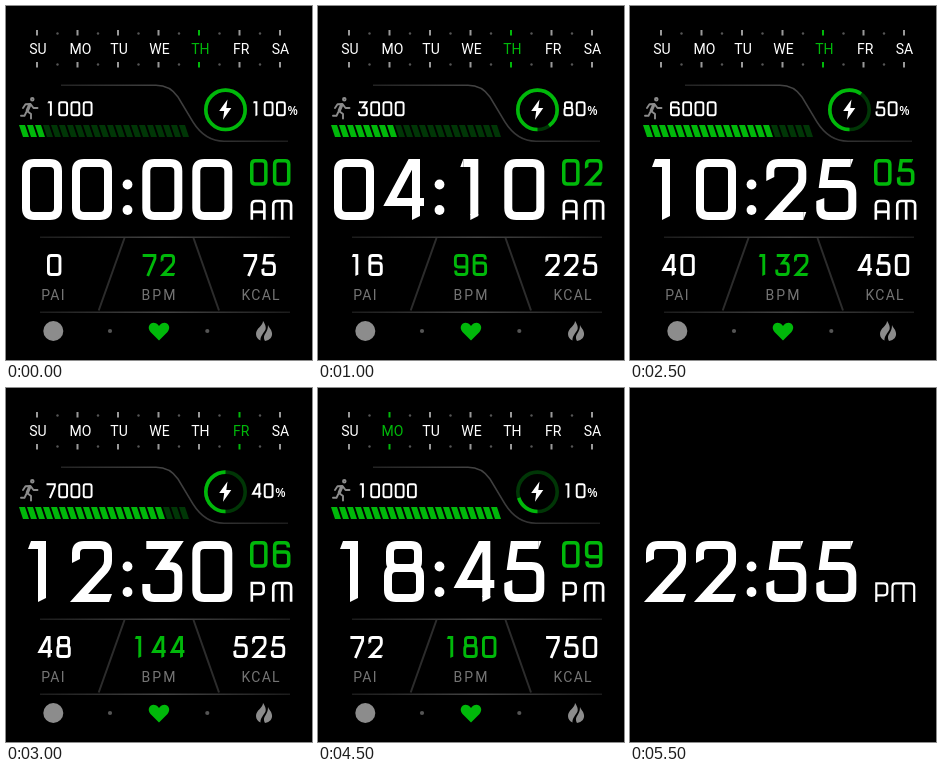
Write an HTML page that moves like this. It is 306 px wide and 354 px high and loops after 6000 ms.

```html
<!DOCTYPE html>
<html lang="en">
<head>
<meta charset="utf-8">
<title>Watch face</title>
<style>
  html, body { margin: 0; width: 100%; height: 100%; overflow: hidden; background: #000; }
  svg { display: block; width: 100%; height: 100%; --green: #00b80a; --dim: #003606; --grey: #8c8c8c; }
  text { font: 14px Roboto, "Open Sans", sans-serif; fill: #fff; text-anchor: middle; }
  .unit text { fill: #747474; }
  .pct { font: 600 12px "Open Sans", sans-serif; text-anchor: start; }
  .line { fill: none; stroke: url(#fade); stroke-width: 1.5; }
  .slope { fill: none; stroke: #2c2c2c; stroke-width: 2; }
  .glyph { fill: none; stroke: currentColor; stroke-width: 8; }
  .tail { fill: currentColor; }
  .runner { fill: none; stroke: var(--grey); stroke-linecap: round; stroke-linejoin: round; }
  .tick { stroke: #999; stroke-width: 2; }
  .on .tick { stroke: var(--green); }
  .on text { fill: var(--green); }
  .green { color: var(--green); }
  .ring { fill: none; stroke: var(--dim); stroke-width: 3.6; }
  .ring.level { stroke: var(--green); }
  .bar { fill: var(--dim); }
  .bar.on { fill: var(--green); }
  .hide { display: none; }
</style>
</head>
<body>
<svg viewBox="0 0 306 354" preserveAspectRatio="none" color="#fff">
  <defs>
    <linearGradient id="fade" gradientUnits="userSpaceOnUse" x1="34" y1="0" x2="284" y2="0">
      <stop offset="0" stop-color="#1c1c1c"/>
      <stop offset=".5" stop-color="#444"/>
      <stop offset="1" stop-color="#1c1c1c"/>
    </linearGradient>
  </defs>

  <g id="face">
    <g id="week"></g>
    <g id="dots" fill="#555"></g>

    <path class="line" d="M55 79.3H150Q164 79.3 172 91L187 116Q199 135.2 218 135.2H282"/>
    <path class="line" d="M34 231.3H284M34 306.2H284"/>
    <path class="slope" d="M118.5 232L92.700 304.500M187.500 232L213 304.500"/>

    <g class="runner" stroke-width="1.9">
      <circle cx="26.300" cy="93.300" r="1.300"/>
      <path d="M17 102L19.500 98.300L24.500 98L27.500 102H31.500M21 105L25 108V112.500M20.300 106L18.500 109.800H15"/>
      <path stroke-width="3.200" d="M23.700 99L21.300 104.500"/>
    </g>
    <g id="bars"></g>

    <circle class="ring" cx="219.500" cy="103.800" r="19.700"/>
    <circle class="ring level" id="level" cx="219.500" cy="103.800" r="19.700" pathLength="100" transform="rotate(90 219.500 103.800)"/>
    <path fill="#fff" d="M221.500 93.500L213.200 105H218.200L217 113.700L225.300 102H220.300Z"/>

    <g class="unit">
      <text x="47.500" y="294" letter-spacing="1.200">PAI</text>
      <text x="153.500" y="294" letter-spacing="2">BPM</text>
      <text x="255.200" y="294" letter-spacing="1.300">KCAL</text>
    </g>

    <g fill="#8c8c8c">
      <circle cx="47.300" cy="325" r="10"/>
      <path d="M257 315C257 320 250 322 250 328C250 331 252 333.500 254.500 334.500C254 330 258 327 259.500 323.500C260.500 321 258.500 317 257 315Z"/>
      <path d="M262 319C262 323 261 325 258.500 329C257.500 331 258 333.500 259 335C264 334 266.500 331 266 327C265.500 323 263 322 262 319Z"/>
    </g>
    <g fill="#555"><circle cx="104" cy="325" r="2.100"/><circle cx="201.300" cy="325" r="2.100"/></g>
    <path fill="#00b80a" d="M153 334.500L144.500 326C140 320.500 145 315 150 317.300Q152 318.300 153 320Q154 318.300 156 317.300C161 315 166 320.500 161.500 326Z"/>

    <g id="values"></g>
  </g>

  <g id="clock"></g>
  <g fill="#fff"><circle cx="121.500" cy="178.500" r="4.900"/><circle cx="121.500" cy="204" r="4.900"/></g>
  <path id="dimPm" class="hide" fill="none" stroke="#fff" stroke-width="2.200"
    d="M246.300 214V195.300H254Q257.300 195.300 257.300 198.500V204Q257.300 207.300 254 207.300H246.300M262.500 214V198.500Q262.500 195.300 265.700 195.300H281Q284.200 195.300 284.200 198.500V214M273.400 195.300V214"/>
</svg>

<script>
  // Stroked letterforms on a 40 x 61 cell.
  const glyphs = {
    0: 'M12 4H28Q36 4 36 12V49Q36 57 28 57H12Q4 57 4 49V12Q4 4 12 4Z',
    1: 'M9 4H20V56',
    2: 'M4 18V12Q4 4 12 4H28Q36 4 36 12V20Q36 25 32.5 29L7 57H37',
    3: 'M4 4H34L20 25H27Q36 25 36 34V48Q36 57 28 57H12Q4 57 4 49V43',
    4: 'M32 56V4H27L6 43H40',
    5: 'M34 4H10L7 25H27Q36 25 36 34V48Q36 57 28 57H12Q4 57 4 49V42',
    6: 'M35 15V12Q35 4 27 4H12Q4 4 4 12V49Q4 57 12 57H28Q36 57 36 49V33Q36 25 28 25H4',
    7: 'M2 4H36V13L16 61',
    8: 'M13 4H27Q34 4 34 11V20Q34 27 27 27H13Q6 27 6 20V11Q6 4 13 4ZM12 27H28Q36 27 36 35V49Q36 57 28 57H12Q4 57 4 49V35Q4 27 12 27Z',
    9: 'M5 46V49Q5 57 13 57H28Q36 57 36 49V12Q36 4 28 4H12Q4 4 4 12V28Q4 36 12 36H36',
    A: 'M4 61V16Q4 4 16 4H30Q42 4 42 16V61M4 37H42',
    M: 'M4 61V16Q4 4 16 4H46Q58 4 58 16V61M31 4V61',
    P: 'M4 61V4H28Q40 4 40 16V26Q40 38 28 38H4'
  };
  // Slanted stroke ends.
  const tails = {
    1: 'M16 55H24V57L16 61ZM9 0V8H6Z',
    2: 'M0 17.9H8L0 22ZM37 61V53H40Z',
    4: 'M28 55H36V57L28 61Z',
    5: 'M34 0H37L34 8ZM0 42.1H8V39Z'
  };
  const days = ['SU', 'MO', 'TU', 'WE', 'TH', 'FR', 'SA'];
  const dayAt = [4, 5, 4, 2, 3, 4, 5, 6, 3, 1];
  const labelX = [32, 74.5, 113, 153.5, 194.3, 235.3, 274.5];
  const STEP = 500, COUNT = 12, BARS = 21;
  const $ = id => document.getElementById(id);
  const pad = n => String(n).padStart(2, '0');
  const list = (n, fn) => Array.from({ length: n }, (_, i) => fn(i)).join('');

  function write(str, x, y, scale, cls = '', pitch = 50) {
    const chars = [...String(str)].map((c, i) =>
      `<g transform="translate(${i * pitch})"><path class="glyph" d="${glyphs[c]}"/>` +
      (tails[c] ? `<path class="tail" d="${tails[c]}"/>` : '') + '</g>').join('');
    return `<g class="${cls}" transform="translate(${x} ${y}) scale(${scale})">${chars}</g>`;
  }

  function stat(n, cx, cls) {
    const s = 0.36, pitch = 52;
    const width = ((String(n).length - 1) * pitch + 40) * s;
    return write(n, cx - width / 2, 248, s, cls, pitch);
  }

  $('week').innerHTML = list(7, i => {
    const x = 31 + i * 40.5;
    return `<g><path class="tick" d="M${x} 24V29.500M${x} 56V61.500"/><text x="${labelX[i]}" y="48">${days[i]}</text></g>`;
  });
  $('dots').innerHTML = list(6, i => {
    const x = 51.5 + i * 40.5;
    return `<circle cx="${x}" cy="27.500" r="1.200"/><circle cx="${x}" cy="58.500" r="1.200"/>`;
  });
  $('bars').innerHTML = list(BARS, i => `<path class="bar" d="M${13 + i * 8} 119h6l4 12h-6z"/>`);

  function draw(k) {
    const asleep = k >= 10;
    $('face').classList.toggle('hide', asleep);
    $('dimPm').classList.toggle('hide', !asleep);
    $('clock').innerHTML = write(pad(2 * k), 16, 153, 1) + write(pad(5 * k), 136.3, 153, 1);
    if (asleep) return;

    const steps = 1000 * (k + 1), battery = 100 - 10 * k;
    const lit = Math.min(BARS, Math.round(BARS * steps / 8000));
    [...$('bars').children].forEach((b, i) => b.classList.toggle('on', i < lit));
    [...$('week').children].forEach((d, i) => d.classList.toggle('on', i === dayAt[k]));
    $('level').setAttribute('stroke-dasharray', Math.min(100, battery + 10) + ' 100');
    $('values').innerHTML =
      write(steps, 40, 95.3, 0.245) +
      write(battery, 245.5, 95.3, 0.245) +
      `<text class="pct" x="${244.8 + 12.2 * String(battery).length}" y="109.300">%</text>` +
      write(pad(k), 244, 153, 0.44, 'green', 52) +
      write(k < 6 ? 'AM' : 'PM', 244.5, 193.7, 0.33, '', 65) +
      stat(8 * k, 48.2) + stat(72 + 12 * k, 152.5, 'green') + stat(75 * (k + 1), 253.3);
  }

  const start = performance.now();
  let shown = -1;
  function tick() {
    const k = Math.floor((performance.now() - start) / STEP) % COUNT;
    if (k !== shown) draw(shown = k);
    requestAnimationFrame(tick);
  }
  tick();
</script>
</body>
</html>
```
